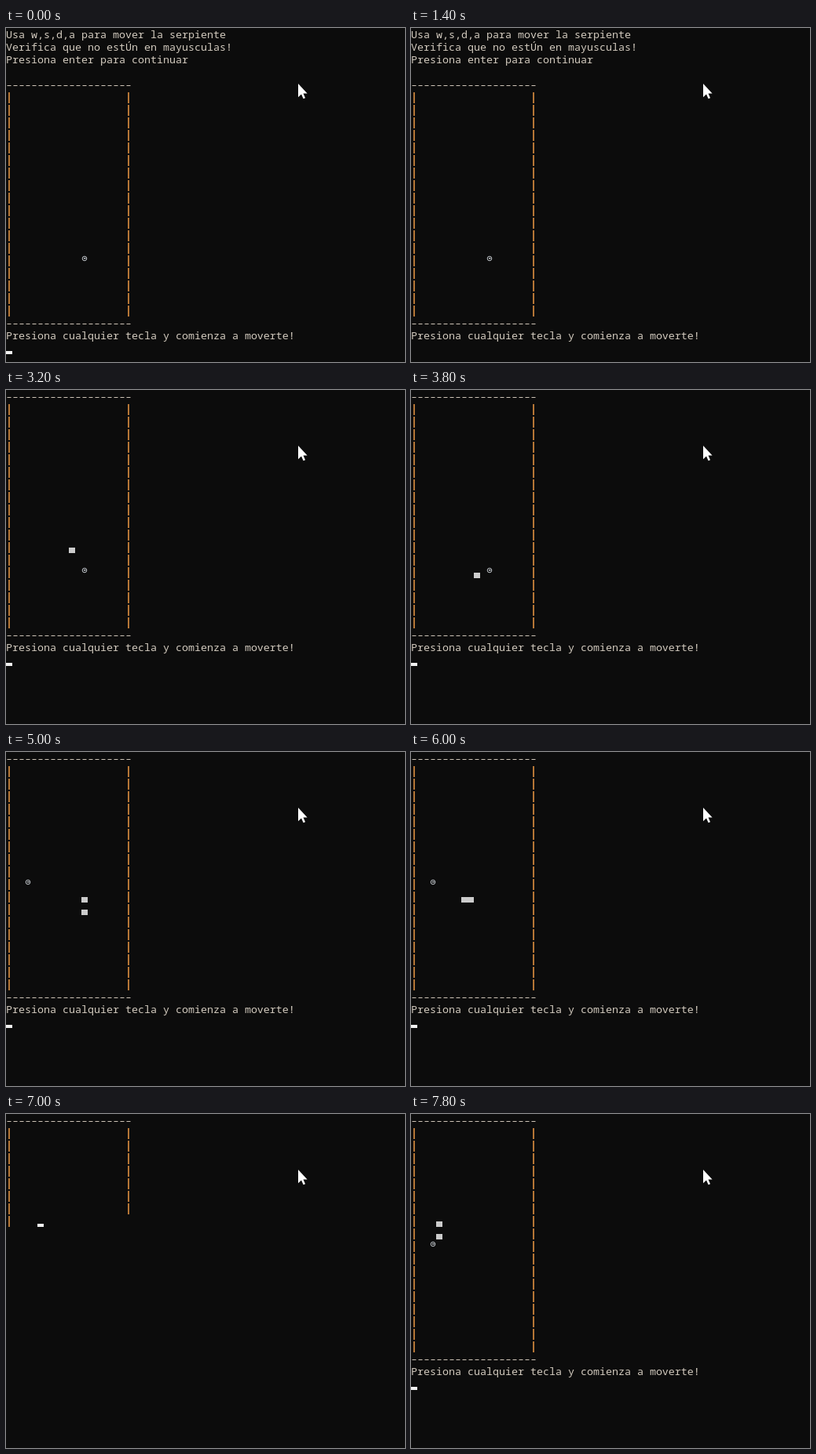
Animation, 508 px wide and 426 px high, one loop 8 s. Source, as an HTML page:

```html
<!DOCTYPE html>
<html lang="es">
<head>
<meta charset="utf-8">
<title>Serpiente</title>
<style>
  html, body { margin: 0; width: 100%; height: 100%; overflow: hidden; background: #0c0c0c; }
  svg { display: block; width: 100%; height: 100%; }
  text { font: 13.333px "Noto Sans Mono", "DejaVu Sans Mono", monospace; fill: #d2cabe; white-space: pre; }
</style>
</head>
<body>
<svg viewBox="0 0 508 426">
  <g id="screen"></g>
  <path d="M372 71V88.3L376 84.6L378.6 90.2L381 89.2L378.5 83.5H383.6Z" fill="#fff"/>
</svg>
<script>
const LOOP = 8000, CW = 8, CH = 16, SIZE = 20;
const GAME_START = 2200, FIRST_MOVE = 2900, MOVE = 250;
const KEYS = "ssssddwwwaaaaaaaawww";
const STEP = { w: [0, -1], s: [0, 1], a: [-1, 0], d: [1, 0] };
const EATEN_AT = 6;
const INTRO = [
  "Usa w,s,d,a para mover la serpiente",
  "Verifica que no estÚn en mayusculas!",
  "Presiona enter para continuar"
];
const PROMPT = "Presiona cualquier tecla y comienza a moverte!";
// moments when the console is caught halfway through a repaint
const REPAINTS = [
  { from: 6930, to: 7130, row: 8, col: 5 },
  { from: 7380, to: 7480, row: 1, col: 9 }
];
const screen = document.getElementById("screen");

const rect = (x, y, w, h, fill) =>
  `<rect x="${x}" y="${y}" width="${w}" height="${h}" fill="${fill}"/>`;
const line = (row, s) => `<text x="0" y="${row * CH + 13}">${s}</text>`;
const caret = (col, row) => rect(col * CW, row * CH + 12, CW, 4, "#f2f2f2");
const block = ([col, row]) => rect(col * CW, row * CH + 9, CW, 7, "#cccccc");
const bar = (col, row) => rect(col * CW + 3, row * CH + 2, 2, 14, "#b57636");
const dashes = row =>
  `<path d="M1.5 ${row * CH + 9.5}H159" stroke="#cfc5b8" stroke-dasharray="5 3"/>`;

function food([col, row]) {
  const x = col * CW + 4, y = row * CH + 6;
  return `<circle cx="${x}" cy="${y}" r="2.8" fill="none" stroke="#bfc4c9"/>` +
    rect(x - 1, y - 1, 2.5, 1.5, "#bfc4c9");
}

function headAt(n) {
  const p = [10, 10];
  for (const k of KEYS.slice(0, n)) {
    p[0] += STEP[k][0];
    p[1] += STEP[k][1];
  }
  return p;
}

// Paints the board from row `top`, up to the board cell `end` when given.
function board(top, end, pieces) {
  const done = (col, row) => !end || row < end.row || (row === end.row && col < end.col);
  let out = dashes(top);
  for (let row = 1; row < SIZE - 1; row++)
    for (const col of [0, SIZE - 1])
      if (done(col, row)) out += bar(col, top + row);
  for (const { cell, draw } of pieces)
    if (done(...cell)) out += draw([cell[0], cell[1] + top]);
  if (end) return out + caret(end.col, top + end.row);
  return out + dashes(top + SIZE - 1) + line(top + SIZE, PROMPT);
}

function intro(t) {
  const on = t < 200 || (t >= 730 && t < 1260) || t >= 1790;
  return INTRO.map((s, i) => line(i, s)).join("") +
    board(4, null, [{ cell: [12, 14], draw: food }]) +
    (on ? caret(0, 25) : "");
}

function game(t) {
  const n = Math.min(KEYS.length, Math.max(0, Math.floor((t - FIRST_MOVE) / MOVE) + 1));
  const fed = n >= EATEN_AT;
  const pieces = [
    { cell: fed ? [3, 10] : [12, 14], draw: food },
    { cell: headAt(n), draw: block }
  ];
  if (fed) pieces.push({ cell: headAt(n - 1), draw: block });
  const end = REPAINTS.find(r => t >= r.from && t < r.to);
  return board(0, end, pieces) + (end ? "" : caret(0, SIZE + 1));
}

let shown = "";
function render(t) {
  const next = t < GAME_START ? intro(t) : game(t);
  if (next !== shown) screen.innerHTML = shown = next;
}

const start = performance.now();
function tick() {
  render((performance.now() - start) % LOOP);
  requestAnimationFrame(tick);
}
tick();
</script>
</body>
</html>
```
